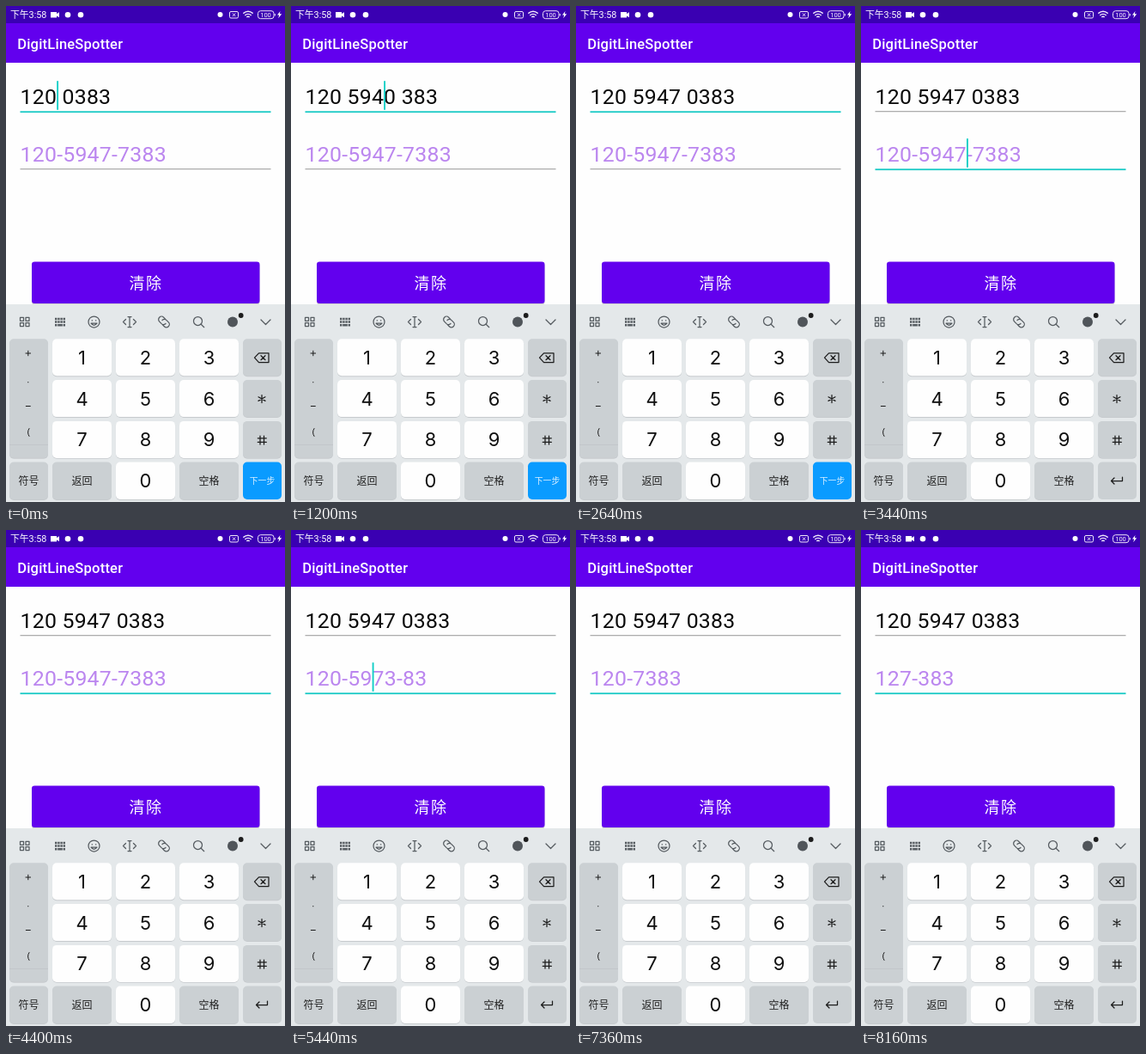
Recreate the animation shown at these times as an HTML page. Size 325 by 577 pixels, loop 8480 ms.

```html
<!DOCTYPE html>
<html lang="zh">
<head>
<meta charset="utf-8">
<style>
  html, body { margin: 0; width: 100%; height: 100%; overflow: hidden; background: #fefefe; }
  svg { display: block; width: 100vw; height: 100vh; }
  text { font-family: Roboto, "Noto Sans CJK SC", "Noto Sans CJK", sans-serif; white-space: pre; }
  .entry { font-size: 24.83px; letter-spacing: .0094em; }
  .num { font: 22px Inter, sans-serif; text-anchor: middle; fill: #111; }
  .label { font-size: 12px; text-anchor: middle; fill: #222; }
  .icon { fill: none; stroke: #555b60; stroke-width: 1.25; stroke-linecap: round; stroke-linejoin: round; }
  .dark { stroke: #1c1c1c; }
  .status { fill: none; stroke: #eee6fa; stroke-width: 1; }
</style>
</head>
<body>
<svg id="stage" viewBox="0 0 325 577" preserveAspectRatio="none">
  <rect width="325" height="577" fill="#fefefe"/>
  <rect width="325" height="20" fill="#3a00b2"/>
  <rect y="20" width="325" height="46" fill="#6200ee"/>

  <!-- status bar -->
  <g fill="#fff">
    <text x="5" y="14" font-size="10.8">下午3:58</text>
    <path d="M52 7h7v2l3-1.8v6L59 11.400v2h-7z"/>
    <circle cx="72" cy="10.300" r="3.300"/>
    <circle cx="87" cy="10.300" r="3.300"/>
    <circle cx="249.500" cy="10" r="3"/>
    <path d="M319.500 6l-3.500 4.500h2.200l-1 3.800 4-5h-2.400z"/>
    <text x="302.500" y="13" font-size="7.500" text-anchor="middle">100</text>
  </g>
  <g class="status">
    <rect x="260.500" y="6.500" width="10" height="7.500" rx="1.500"/>
    <path d="M264 8.500l3.200 3.500m0-3.500l-3.200 3.500"/>
    <rect x="293.500" y="5.700" width="18.500" height="9" rx="3"/>
    <path d="M313.300 9v2.500"/>
    <path d="M276.300 8.600q5.700-4.800 11.400 0M278.300 10.900q3.700-3 7.400 0M280.300 13q1.700-1.400 3.400 0" stroke-width="1.400"/>
  </g>

  <text x="13.200" y="49.700" font-size="16.550" font-weight="500" letter-spacing=".2" fill="#fff">DigitLineSpotter</text>

  <g id="fields"></g>

  <rect x="30" y="298.500" width="265.500" height="49" rx="3.500" fill="#000" opacity=".18"/>
  <rect x="30" y="297.500" width="265.500" height="48.500" rx="3.300" fill="#6200ee"/>
  <text x="143.500" y="329" font-size="18" letter-spacing="1.600" fill="#fff">清除</text>

  <!-- keyboard -->
  <rect y="347" width="325" height="230" fill="#e4e8ea"/>
  <g class="icon">
    <path d="M16.500 362.300h4v4h-4zm6.500 0h4v4h-4zm-6.500 6.300h4v4h-4zm6.500 0h4v4h-4z"/>
    <path d="M57 364h12M57 367.500h12" stroke-width="2.500" stroke-linecap="butt" stroke-dasharray="2.400 .8"/>
    <path d="M57 371.300h12" stroke-width="2.500" stroke-linecap="butt" stroke-dasharray="2.400 .8 5.600 .8"/>
    <circle cx="102.500" cy="367.500" r="6.500"/>
    <path d="M99 369q3.500 4.500 7 0zM100.300 365.500v.4m4.400-.4v.4"/>
    <path d="M144 362v11m-2-11.500h4m-4 12h4M139.500 364.500l-3 3 3 3m9-6l3 3-3 3"/>
    <g transform="rotate(45 184 367.500)">
      <path d="M183 364h-3a3.500 3.500 0 0 0 0 7h3.500a3.500 3.500 0 0 0 3.300-3.500M185 371h3a3.500 3.500 0 0 0 0-7h-3.500a3.500 3.500 0 0 0-3.300 3.500"/>
    </g>
    <circle cx="223.500" cy="366.500" r="5"/>
    <path d="M227.200 370.200l3.500 3.500M297 365l5.500 5.500 5.500-5.500"/>
  </g>
  <circle cx="264" cy="367.500" r="6" fill="#50555a"/>
  <circle cx="273.700" cy="360" r="2.900" fill="#1c1c1c"/>

  <g id="keys"></g>
  <path d="M4 510.500h45" stroke="#c0c5c8" stroke-width=".8"/>
  <g class="icon dark">
    <path d="M294.500 403.800h11.500v10.800h-11.500l-5-5.400zM297 406.700l5 5m0-5l-5 5"/>
    <path d="M298 452.500v9M294 454.800l8 4.600m0-4.600l-8 4.600"/>
    <path d="M296 500v10m4.500-10v10M293.300 502.800h10m-10 4.600h10"/>
    <path d="M23 404h5.600m-2.800-2.800v5.600M23.300 465.500h5" stroke-width="1"/>
    <path d="M27 491.500q-3 4.500 0 9" stroke-width="1"/>
    <path d="M25.800 437.500v.2" stroke-width="1.200"/>
  </g>
  <g id="nextKey">
    <rect x="276" y="530.500" width="45" height="43.500" rx="5" fill="#0a9bff"/>
    <text x="298.500" y="556" font-size="9.800" text-anchor="middle" fill="#dff1ff">下一步</text>
  </g>
  <g id="enterKey">
    <rect x="276" y="530.500" width="45" height="43.500" rx="5" fill="#cbd0d3"/>
    <path class="icon dark" stroke-width="1.500" d="M304.500 548v4.500h-13m3.500-3.500l-3.500 3.500 3.500 3.500"/>
  </g>
</svg>
<script>
const LOOP = 8480, TICK = 80, BLINK = 500;
const FOCUS_SECOND = 3440;
const TEXT_X = 16.6;

const byId = id => document.getElementById(id);

function add(parent, tag, attrs, content = "") {
  const node = document.createElementNS("http://www.w3.org/2000/svg", tag);
  for (const name in attrs) node.setAttribute(name, attrs[name]);
  node.textContent = content;
  parent.appendChild(node);
  return node;
}

function addKey(x, y, w, h, fill, label, kind) {
  const keys = byId("keys");
  add(keys, "rect", { x, y: y + 0.9, width: w, height: h, rx: 5, fill: "#b9bec2", opacity: 0.7 });
  add(keys, "rect", { x, y, width: w, height: h, rx: 5, fill });
  if (label) {
    const drop = kind === "num" ? 8 : 4.5;
    add(keys, "text", { class: kind, x: x + w / 2, y: y + h / 2 + drop }, label);
  }
}

const GRAY = "#cbd0d3", WHITE = "#fefefe";
const columnX = col => 54 + col * 74;
const rowY = row => 387.3 + row * 47.8;

addKey(4, rowY(0), 45, 138.5, GRAY);
for (let i = 0; i < 9; i++)
  addKey(columnX(i % 3), rowY(Math.floor(i / 3)), 69, 43, WHITE, String(i + 1), "num");
for (let row = 0; row < 3; row++) addKey(276, rowY(row), 45, 43, GRAY);
addKey(4, 530.5, 45, 43.5, GRAY, "符号", "label");
addKey(columnX(0), 530.5, 69, 43.5, GRAY, "返回", "label");
addKey(columnX(1), 530.5, 69, 43.5, WHITE, "0", "num");
addKey(columnX(2), 530.5, 69, 43.5, GRAY, "空格", "label");

// Each edit is a typed digit, or "<" for backspace.
const fields = [
  { baseline: 114, color: "#0a0a0a", gap: " ", digits: "1200383", at: 3, from: 0,
    edits: [[400, "5"], [720, "9"], [1040, "4"], [1760, "7"]] },
  { baseline: 181, color: "#bb86ef", gap: "-", digits: "12059477383", at: 7, from: FOCUS_SECOND,
    edits: [[4720, "<"], [5200, "<"], [6080, "<"], [6800, "<"], [7520, "<"]] }
];

for (const field of fields) {
  const group = byId("fields"), y = field.baseline;
  field.line = add(group, "rect", { x: 16.5, y: y + 8.3, width: 292 });
  field.text = add(group, "text", { class: "entry", x: TEXT_X, y, fill: field.color });
  field.caret = add(group, "rect", { y: y - 26.8, width: 1.9, height: 33.6, fill: "#12cfc6" });
}

// Groups digits as 3-4-4.
const format = (digits, gap) =>
  [digits.slice(0, 3), digits.slice(3, 7), digits.slice(7)].filter(Boolean).join(gap);

function stateAt(field, time) {
  let { digits, at, from: touched } = field;
  for (const [when, key] of field.edits) {
    if (when > time) break;
    const erase = key === "<";
    digits = digits.slice(0, erase ? at - 1 : at) + (erase ? "" : key) + digits.slice(at);
    at += erase ? -1 : 1;
    touched = when;
  }
  return { text: format(digits, field.gap), caret: at + (at > 3) + (at > 7), touched };
}

function drawField(field, focused, time) {
  const { text, caret, touched } = stateAt(field, time);
  if (field.text.textContent !== text) field.text.textContent = text;
  const x = TEXT_X + field.text.getSubStringLength(0, caret);
  field.caret.setAttribute("x", x);
  const lit = focused && (time - touched) % (2 * BLINK) < BLINK;
  field.caret.setAttribute("visibility", lit ? "visible" : "hidden");
  field.line.setAttribute("height", focused ? 1.8 : 0.9);
  field.line.setAttribute("fill", focused ? "#1bcac6" : "#8c8c8c");
}

function render(elapsed) {
  const time = Math.floor((elapsed % LOOP) / TICK) * TICK;
  const active = time < FOCUS_SECOND ? 0 : 1;
  fields.forEach((field, i) => drawField(field, i === active, time));
  byId("nextKey").setAttribute("visibility", active ? "hidden" : "visible");
  byId("enterKey").setAttribute("visibility", active ? "visible" : "hidden");
}

const start = performance.now();
function loop(now) {
  render(Math.max(0, now - start));
  requestAnimationFrame(loop);
}
render(0);
requestAnimationFrame(loop);
</script>
</body>
</html>
```
